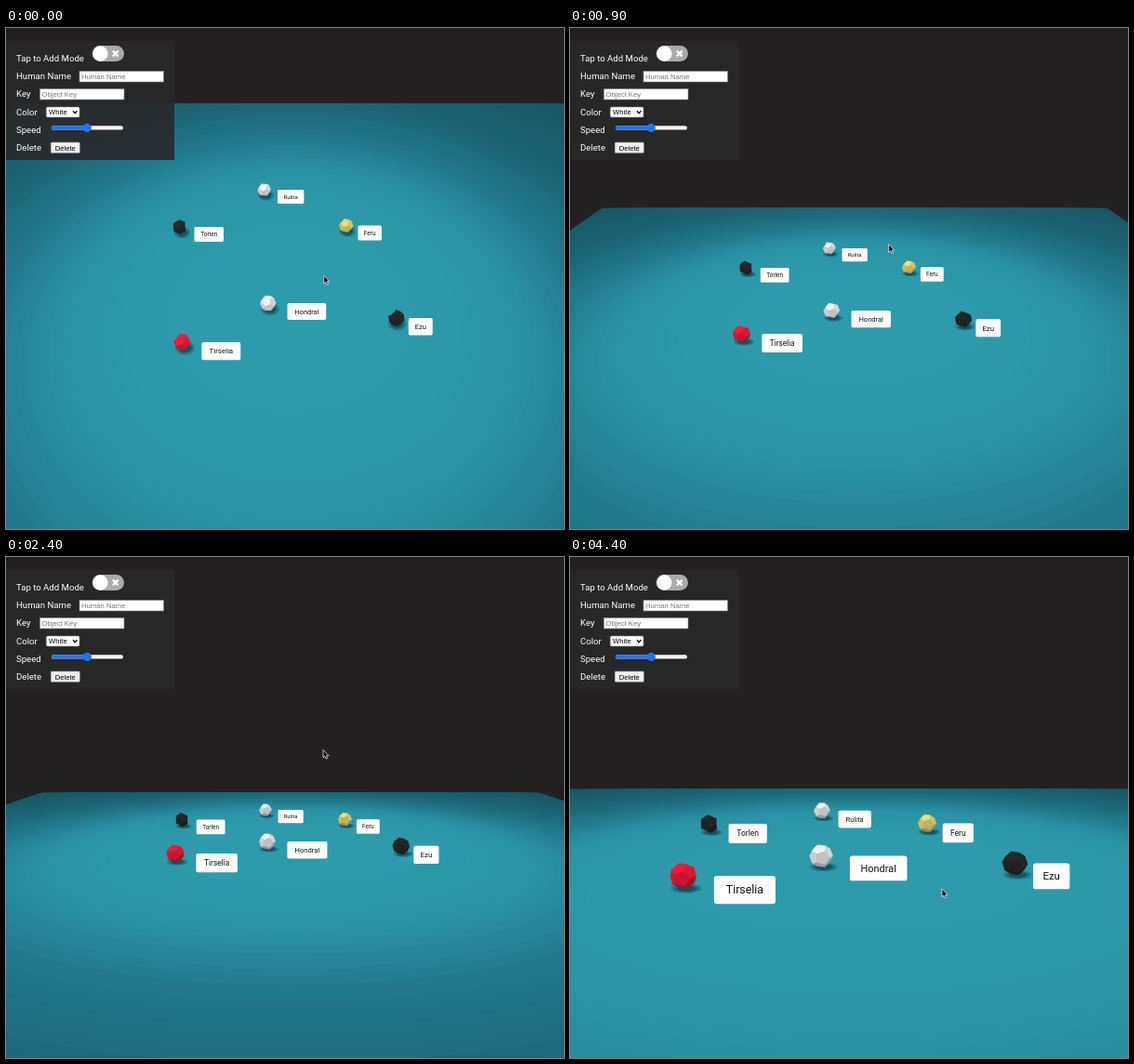
An HTML page for the animation above (4500 ms loop, 600 by 539 pixels).

```html
<!DOCTYPE html>
<html lang="en">
<head>
<meta charset="utf-8">
<title>Table view</title>
<style>
  html, body { margin: 0; width: 100%; height: 100%; overflow: hidden; background: #232022; }
  svg { display: block; width: 600px; height: 539px; }
  text { font-family: Roboto, Inter, sans-serif; }
  .caption { font-size: 9.6px; fill: #fff; }
  .field { font: 7.7px "Liberation Sans", Arial, sans-serif; }
  .box { fill: #fff; stroke: #858585; stroke-width: .6; }
</style>
</head>
<body>
<svg viewBox="0 0 600 539">
  <defs>
    <radialGradient id="shade">
      <stop offset=".45" stop-color="#0b3a45" stop-opacity=".75"/>
      <stop offset="1" stop-color="#0b3a45" stop-opacity="0"/>
    </radialGradient>
    <clipPath id="tableClip"><path id="tableEdge"/></clipPath>
  </defs>
  <rect width="600" height="539" fill="#232022"/>
  <g id="table" clip-path="url(#tableClip)"></g>
  <g id="pieces"></g>

  <g id="panel">
    <rect y="14" width="181" height="128" fill="#2a282a" fill-opacity=".9"/>
    <g class="caption">
      <text x="11" y="36">Tap to Add Mode</text>
      <text x="11" y="55">Human Name</text>
      <text x="11" y="74">Key</text>
      <text x="11" y="93.5">Color</text>
      <text x="11" y="112.5">Speed</text>
      <text x="11" y="131.5">Delete</text>
    </g>
    <rect x="92.7" y="19" width="34.3" height="17" rx="8.5" fill="#aaa"/>
    <circle cx="101.4" cy="27.5" r="8.2" fill="#fff"/>
    <path d="M114.8 24.6l5.8 5.8m0-5.8l-5.8 5.8" stroke="#fff" stroke-width="2.2"/>
    <rect class="box" x="79" y="46.5" width="90.5" height="11.5"/>
    <text class="field" x="81" y="55" fill="#757575">Human Name</text>
    <rect class="box" x="36.5" y="65.5" width="90.5" height="11.5"/>
    <text class="field" x="38.5" y="74" fill="#757575">Object Key</text>
    <rect class="box" x="43.3" y="85" width="35.7" height="11" rx="1.5"/>
    <text class="field" x="46" y="93.3">White</text>
    <path d="M72 89.3l2.2 2.4 2.2-2.4" fill="none" stroke="#000" stroke-width="1.3"/>
    <rect x="49" y="105.2" width="77" height="4.4" rx="2.2" fill="#f4f4f4"/>
    <rect x="49" y="105.2" width="40" height="4.4" rx="2.2" fill="#2272ec"/>
    <circle cx="87.3" cy="107.4" r="4.6" fill="#2272ec"/>
    <rect class="box" x="48.2" y="123" width="31.2" height="11.4" rx="1" style="fill:#efefef"/>
    <text class="field" x="63.8" y="131.5" text-anchor="middle">Delete</text>
  </g>
  <path id="cursor" d="M0 0V8.6L1.9 7 3.2 9.9 4.7 9.3 3.4 6.4H6Z" fill="#0a0a0a" stroke="#fff" stroke-width=".7"/>
</svg>
<script>
const LOOP = 4500, STEP = 100;
const FOCAL = 650.6, CX = 306, CY = 269.5;
const BALL_LEVEL = .0562, TABLE_LEVEL = .069;   // drop below the camera target
const TABLE_X = .6866, TABLE_Z = .67;
const RADIUS = .0136, LABEL_HEIGHT = .0288, FONT = .0118;
const PHI = (1 + Math.sqrt(5)) / 2;

const el = id => document.getElementById(id);

// Each track is a list of [time, value].
const pitchTrack = [[0, 46.4], [500, 31], [900, 22.4], [1600, 11.5], [2200, 9.4]];
const distanceTrack = [[2900, 1], [3600, .804], [4100, .698]];
const cursorX = [[0, 341.8], [500, 342.7], [900, 342.7], [1600, 341], [2400, 341], [2800, 342], [3600, 342], [4100, 400]];
const cursorY = [[0, 266.3], [500, 245.3], [900, 232.7], [1600, 216.7], [2200, 207], [2400, 207.3], [2800, 316], [3600, 316], [4100, 357]];

const pieces = [
  { name: "Rulita",   x: -.0545, z: .3076,  width: .0548, color: [230, 230, 232], turn: .2 },
  { name: "Feru",     x: .108,   z: .1957,  width: .046,  color: [228, 208, 104], turn: .5 },
  { name: "Torlen",   x: -.215,  z: .1918,  width: .0568, color: [37, 38, 40],    turn: .9 },
  { name: "Hondral",  x: -.0387, z: -.0049, width: .0664, color: [228, 228, 230], turn: .35 },
  { name: "Ezu",      x: .1774,  z: -.038,  width: .0405, color: [36, 37, 39],    turn: .7 },
  { name: "Tirselia", x: -.1754, z: -.089,  width: .063,  color: [238, 22, 52],   turn: .45 }
];

// Monotone cubic interpolation through a track.
function sample(track, t) {
  const last = track.length - 1;
  if (t <= track[0][0]) return track[0][1];
  if (t >= track[last][0]) return track[last][1];
  const rate = i => (track[i + 1][1] - track[i][1]) / (track[i + 1][0] - track[i][0]);
  const slope = i => {
    if (i === 0) return rate(0);
    if (i === last) return rate(last - 1) * .5;
    const a = rate(i - 1), b = rate(i);
    return a * b > 0 ? 2 * a * b / (a + b) : 0;
  };
  let i = 0;
  while (t >= track[i + 1][0]) i++;
  const [t0, v0] = track[i], [t1, v1] = track[i + 1];
  const h = t1 - t0, u = (t - t0) / h, w = 1 - u;
  return v0 * w * w * (1 + 2 * u) + v1 * u * u * (3 - 2 * u)
    + h * (slope(i) * u * w * w - slope(i + 1) * u * u * w);
}

function makeCamera(t) {
  const angle = sample(pitchTrack, t) * Math.PI / 180;
  const distance = sample(distanceTrack, t);
  const s = Math.sin(angle), c = Math.cos(angle);
  return {
    s, c,
    project(x, y, z) {
      const depth = Math.max(.03, distance + z * c - y * s);
      const scale = FOCAL / depth;
      return { x: CX + x * scale, y: CY - (y * c + z * s) * scale, scale };
    }
  };
}

const pathOf = points => "M" + points.map(p => p.x.toFixed(2) + " " + p.y.toFixed(2)).join("L") + "Z";

// Dodecahedron: corner points and the five corners around each face normal.
const dot = (a, b) => a[0] * b[0] + a[1] * b[1] + a[2] * b[2];
const cross = (a, b) => [a[1] * b[2] - a[2] * b[1], a[2] * b[0] - a[0] * b[2], a[0] * b[1] - a[1] * b[0]];
const signs = [-1, 1];
const corners = [], normals = [];
for (const a of signs) for (const b of signs) {
  for (const c of signs) corners.push([a, b, c]);
  const p = a / PHI, q = b * PHI;
  corners.push([0, p, q], [p, q, 0], [q, 0, p]);
  normals.push([0, q, a], [a, 0, q], [q, a, 0]);
}
const faces = normals.map(normal => {
  const ring = corners.filter(v => dot(v, normal) > 2.6);
  const side = ring[0], up = cross(normal, side);
  const base = dot(side, normal) / dot(normal, normal);
  const axis = side.map((v, i) => v - normal[i] * base);
  const turn = v => Math.atan2(dot(v, up) / Math.sqrt(dot(up, up)), dot(v, axis) / Math.sqrt(dot(axis, axis)));
  ring.sort((a, b) => turn(a) - turn(b));
  const length = Math.sqrt(dot(normal, normal));
  return { ring, normal: normal.map(v => v / length) };
});

function spin([x, y, z], a) {
  const c = Math.cos(a), s = Math.sin(a);
  return [x * c + z * s, y, z * c - x * s];
}

function drawBall(camera, { x, z, color, turn }) {
  const size = RADIUS / Math.sqrt(3);
  return faces.map(({ ring, normal }) => {
    const n = spin(normal, turn);
    if (n[1] * camera.s - n[2] * camera.c < .02) return "";
    const light = .86 + .22 * n[1] - .05 * n[0];
    const fill = `rgb(${color.map(v => Math.min(255, Math.round(v * light)))})`;
    const points = ring.map(v => {
      const p = spin(v, turn);
      return camera.project(x + p[0] * size, p[1] * size - BALL_LEVEL, z + p[2] * size);
    });
    return `<path d="${pathOf(points)}" fill="${fill}" stroke="${fill}" stroke-width=".3"/>`;
  }).join("");
}

function drawShadow(camera, { x, z }) {
  const p = camera.project(x + .003, -TABLE_LEVEL, z - .002);
  const rx = RADIUS * 1.3 * p.scale;
  return `<ellipse cx="${p.x}" cy="${p.y}" rx="${rx}" ry="${rx * Math.max(.32, camera.s)}" fill="url(#shade)"/>`;
}

function drawLabel(camera, { name, x, z, width }) {
  const p = camera.project(x, -BALL_LEVEL, z);
  const w = width * p.scale, h = LABEL_HEIGHT * p.scale, font = FONT * p.scale;
  return `<rect x="${p.x + w / 2}" y="${p.y}" width="${w}" height="${h}" rx="${.0028 * p.scale}" fill="#fff"/>`
    + `<text x="${p.x + w}" y="${p.y + h / 2 + font * .35}" font-size="${font}" text-anchor="middle" fill="#111">${name}</text>`;
}

// Lamp light on the cloth: colour by distance from the middle.
const lamp = [[.2, [45, 155, 172]], [.38, [42, 147, 164]], [.53, [33, 121, 138]], [.68, [28, 101, 117]], [.95, [24, 86, 100]]];
const lampColor = r => `rgb(${[0, 1, 2].map(i => Math.round(sample(lamp.map(([d, c]) => [d, c[i]]), r)))})`;
const rings = Array.from({ length: 46 }, (_, i) => {
  const r = .95 - i * .0165;
  return { r, color: lampColor(r) };
});

function drawTable(camera) {
  const ground = (x, z) => camera.project(x, -TABLE_LEVEL, z);
  el("tableEdge").setAttribute("d", pathOf([
    ground(-TABLE_X, TABLE_Z), ground(TABLE_X, TABLE_Z),
    ground(TABLE_X, -TABLE_Z), ground(-TABLE_X, -TABLE_Z)
  ]));
  el("table").innerHTML = `<rect width="600" height="539" fill="${rings[0].color}"/>` + rings.map(({ r, color }) => {
    const points = Array.from({ length: 60 }, (_, i) => {
      const a = i * Math.PI / 30;
      return ground(r * Math.cos(a), r * Math.sin(a));
    });
    return `<path d="${pathOf(points)}" fill="${color}"/>`;
  }).join("");
}

function render(t) {
  const camera = makeCamera(t);
  const draw = part => pieces.map(piece => part(camera, piece)).join("");
  drawTable(camera);
  el("pieces").innerHTML = draw(drawShadow) + draw(drawBall) + draw(drawLabel);
  el("cursor").setAttribute("transform", `translate(${sample(cursorX, t)} ${sample(cursorY, t)})`);
}

let start = null, shown = -1;
function tick(now) {
  if (start === null) start = now;
  const t = Math.floor((now - start) % LOOP / STEP) * STEP;
  if (t !== shown) render(shown = t);
  requestAnimationFrame(tick);
}
render(0);
requestAnimationFrame(tick);
</script>
</body>
</html>
```
